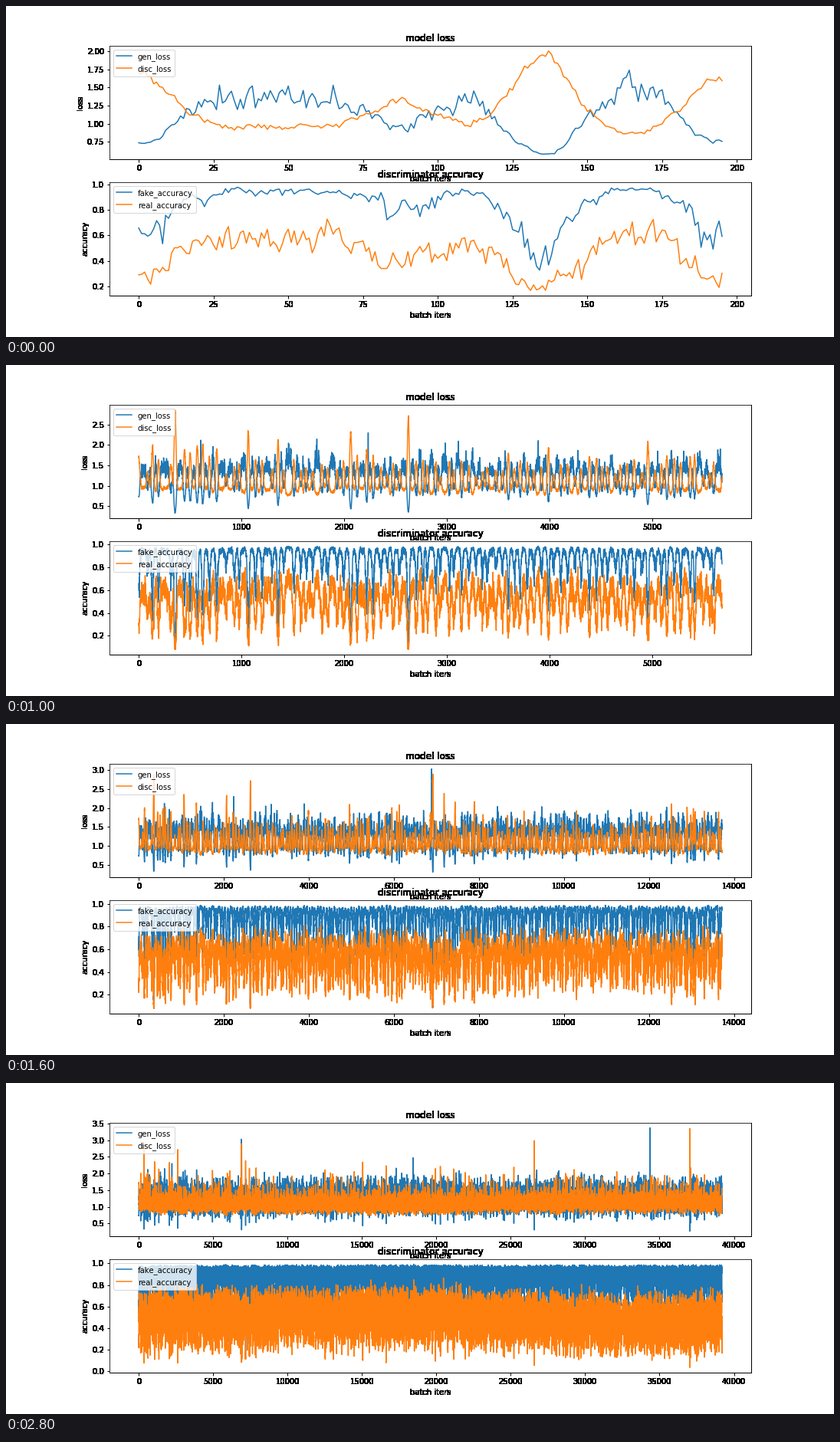
Animation, 1080 px wide and 432 px high, one loop 2900 ms. Source, as a matplotlib script:

```python
import numpy as np
import matplotlib.pyplot as plt
from matplotlib.animation import FuncAnimation

BATCHES, EPOCHS, FRAMES = 196, 200, 29
TOTAL = BATCHES * EPOCHS
CREST_GAP, CREST_WIDTH = 65, 16
rng = np.random.default_rng(12)
t = np.arange(TOTAL)

plt.rcParams.update({
    "font.family": "DejaVu Sans",
    "font.size": 10,
    "figure.subplot.bottom": 0.125,
    "text.kerning_factor": 6,
    "agg.path.chunksize": 20000,
})

# Main crests of the discriminator loss; seeded ones fill the gaps between them.
LANDMARKS = [(0, 1.69), (88, 1.3), (135, 1.94), (193, 1.63), (314, 1.5), (355, 2.79),
             (447, 1.85), (503, 1.8), (570, 1.95), (624, 2.0), (1068, 2.3), (1358, 2.12),
             (2066, 2.33), (2627, 2.65), (6917, 2.88), (26580, 2.9), (37040, 3.13), (TOTAL, 1.5)]
GEN_SPIKES = [(605, 2.12), (2236, 2.3), (6890, 3.03), (18437, 2.47), (34360, 3.37)]


def sigmoid(v):
    return 1 / (1 + np.exp(-v))


def noise(scale):
    white = rng.normal(size=TOTAL)
    slow = np.convolve(rng.normal(size=TOTAL), np.ones(4) / 2, "same")
    return scale * (0.7 * white + 0.6 * slow)


def make_crests():
    crests = [LANDMARKS[0]]
    for (start, _), (end, height) in zip(LANDMARKS, LANDMARKS[1:]):
        parts = max(1, (end - start) // CREST_GAP)
        step = (end - start) / parts
        for part in range(1, parts):
            crests.append((start + step * (part + rng.uniform(-.25, .25)), 1.2 + rng.gamma(2, .14)))
        crests.append((end, height))
    return np.array(crests).T


def make_level():
    """Log of the discriminator loss: bell-shaped crests over a drifting floor."""
    at, height = make_crests()
    middle = (at[1:] + at[:-1]) / 2
    floor = np.interp(t, middle, np.log(rng.uniform(.76, .96, len(middle))))
    nearest = np.searchsorted(middle, t)
    bell = np.exp(-((t - at[nearest]) / CREST_WIDTH) ** 2)
    return floor + (np.log(height[nearest]) - floor) * bell


def make_series():
    level = make_level()
    late = np.clip((t - 20000) / 12000, 0, 1)
    disc = np.exp(level + .04 * late + noise(.025))
    gen = np.exp(.28 - level - .35 * level ** 2 + noise(.075) * np.clip(1 - level, .25, 1.2)).clip(.2, 2.2)
    for at, top in GEN_SPIKES:
        gen = np.maximum(gen, top * np.exp(-abs(t - at) / 6))
    fake = sigmoid(2.6 - 4.3 * level + noise(.35))
    real = sigmoid(.25 - 2.5 * level - .3 * late + noise(.28))
    return gen, disc, fake, np.maximum(real, .08 - .043 * late)


def harden(image, dpi):
    """Turn every touched pixel solid black."""
    solid = np.zeros_like(image)
    solid[..., 3] = image[..., 3] > 0
    return solid, 0, 0


def style(ax, title, ylabel):
    ax.set_title(title)
    ax.set_xlabel("batch iters")
    ax.set_ylabel(ylabel)
    ax.tick_params(width=1)
    ax.spines[["right", "bottom"]].set_linewidth(1)
    ax.legend(loc="upper left")
    for text in (ax.title, ax.xaxis.label, ax.yaxis.label):
        text.set_agg_filter(harden)


gen, disc, fake, real = make_series()
fig, (loss_ax, acc_ax) = plt.subplots(2, 1, figsize=(15, 6), dpi=72)
lines = []
for ax, data, label in ((loss_ax, gen, "gen_loss"), (loss_ax, disc, "disc_loss"),
                        (acc_ax, fake, "fake_accuracy"), (acc_ax, real, "real_accuracy")):
    lines.append((ax.plot([], [], label=label)[0], data))
style(loss_ax, "model loss", "loss")
style(acc_ax, "discriminator accuracy", "accuracy")


def epochs_at(frame):
    return 1 if frame == 0 else min(EPOCHS, 2 + frame * (frame + 1) // 4)


def update(frame):
    count = BATCHES * epochs_at(frame)
    for line, data in lines:
        line.set_data(t[:count], data[:count])
    for ax in (loss_ax, acc_ax):
        ax.relim()
        ax.autoscale_view()
        for label in ax.get_xticklabels() + ax.get_yticklabels():
            label.set_agg_filter(harden)
    return [line for line, _ in lines]


anim = FuncAnimation(fig, update, frames=FRAMES, interval=100, repeat=True, repeat_delay=0)
plt.show()
```
